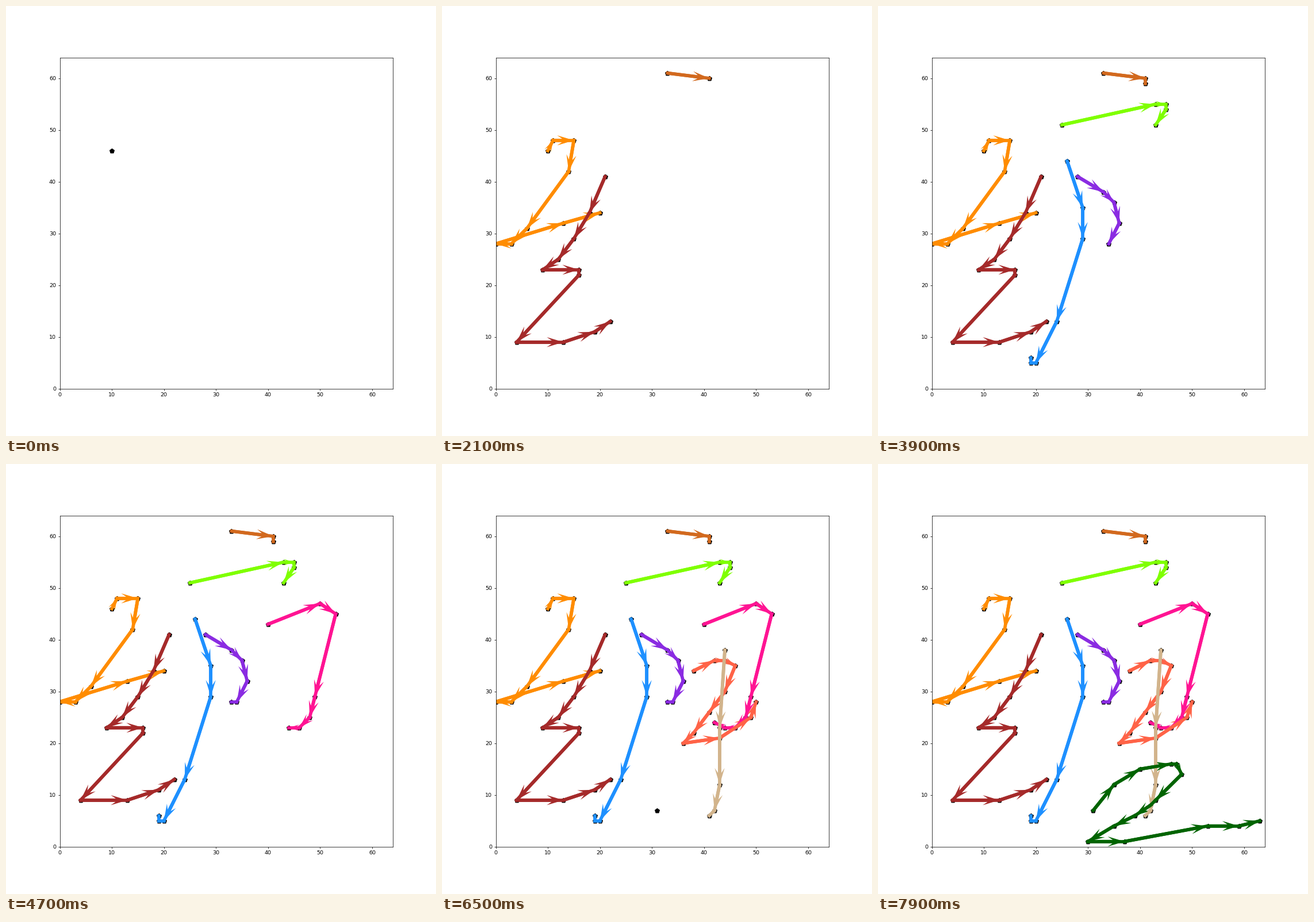
A matplotlib script that plays this animation: 748x748 px, repeating every 8000 ms.

```python
import matplotlib.pyplot as plt
import numpy as np
from matplotlib.animation import FuncAnimation

FRAME_COUNT = 80
INTERVAL = 100

fig, ax = plt.subplots(figsize=(11, 11), dpi=68)
ax.set_xlim(0, 64)
ax.set_ylim(0, 64)

steps = []  # artists that appear together, one group per frame


def bend(count, control, end):
    """A quadratic curve from the pen's place, walked in equal time steps on the grid."""
    def points(start):
        t = np.arange(1, count + 1)[:, None] / count
        curve = ((1 - t) ** 2 * np.array(start)
                 + 2 * t * (1 - t) * np.array(control)
                 + t ** 2 * np.array(end))
        return [tuple(p) for p in np.round(curve)]
    return points


def add_stroke(color, start, *moves):
    """Queue a pen stroke: a dot per point, joined by arrows."""
    path = [start]
    for move in moves:
        path += move(path[-1]) if callable(move) else [move]
    for i, (x, y) in enumerate(path):
        step = [ax.scatter(x, y, s=80, c="black", marker="p")]
        if i:
            px, py = path[i - 1]
            step += ax.plot([px, x], [py, y], color=color, lw=6)
            step.append(ax.quiver(px, py, x - px, y - py, color=color,
                                  angles="xy", scale_units="xy", scale=1,
                                  width=0.01, headaxislength=3.5))
        steps.append(step)


add_stroke("darkorange", (10, 46), (11, 48), (15, 48), (14, 42), (6, 31),
           (3, 28), (0, 28), (13, 32), (20, 34))
add_stroke("brown", (21, 41), bend(4, (15, 26), (9, 23)), (16, 23), (16, 22),
           (4, 9), bend(3, (19, 9), (22, 13)))
add_stroke("chocolate", (33, 61), (41, 60), (41, 59))
add_stroke("chartreuse", (25, 51), (43, 55), bend(3, (47.5, 56), (43, 51)))
add_stroke("dodgerblue", (26, 44), (29, 35), (29, 29),
           bend(3, (19.5, -1), (19, 5)), (19, 6))
add_stroke("blueviolet", (28, 41), bend(4, (39.9, 36.5), (34, 28)), (33, 28))
add_stroke("deeppink", (40, 43), (50, 47), (53, 45), (49, 29),
           bend(4, (46.5, 19.5), (42, 24)))
add_stroke("tomato", (38, 34), bend(3, (44, 38), (46, 35)),
           bend(4, (41, 24), (36, 20)), (43, 21), (49, 25), (50, 28))
add_stroke("tan", (44, 38), bend(4, (43, 3), (41, 6)))
add_stroke("darkgreen", (31, 7), bend(3, (36, 15), (46, 16)), (47, 16),
           (48, 14), (43, 9), bend(4, (41.5, 7.3), (30, 1)),
           (37, 1), (53, 4), (59, 4), (63, 5))


def update(frame):
    for index, step in enumerate(steps):
        for artist in step:
            artist.set_visible(index <= frame)
    return []


animation = FuncAnimation(fig, update, frames=FRAME_COUNT, interval=INTERVAL,
                          init_func=lambda: update(0), repeat=True,
                          repeat_delay=0)
plt.show()
```
